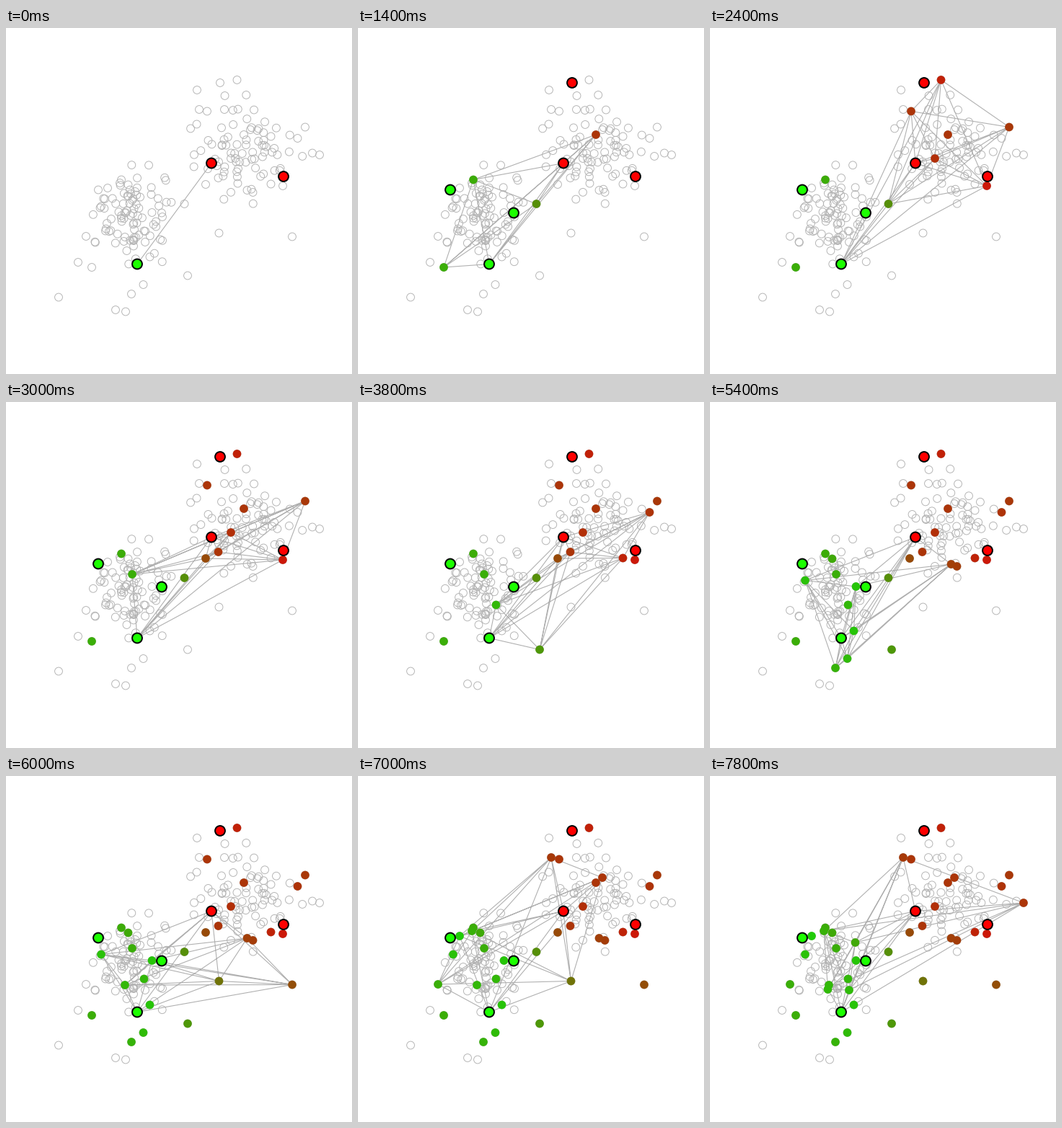
A matplotlib script for the animation above (8000 ms loop, 480 by 480 pixels).

```python
import itertools

import matplotlib.pyplot as plt
import numpy as np
from matplotlib.animation import FuncAnimation

SIZE, DPI = 480, 100
FRAMES, STEP = 40, 200
WINDOW = 6
PT = 72 / DPI  # points per pixel

# Known samples; the first of each class is a pole of the graph.
REDS = [(285, 187.5), (385, 206), (297, 76)]
GREENS = [(182, 327.5), (128, 224.5), (216, 256.5)]
POLES = [REDS[0], GREENS[0]]

# Unlabelled samples in order of arrival.
GUESSES = [
    (160, 210.5), (119, 332), (330, 148), (247.5, 244), (320.5, 72),
    (279, 115.5), (415, 137.5), (384, 219), (312, 181), (175, 239),
    (294.5, 208), (277, 217), (252, 343.5), (191.5, 281.5), (367.5, 216.5),
    (404.5, 153), (342.5, 228), (169.5, 217.5), (199.5, 317.5), (174, 369),
    (190.5, 356), (202.5, 256), (334.5, 225), (132, 247.5), (397, 289.5),
    (165, 290), (295.5, 284.5), (339, 141), (141, 222), (111, 289),
    (268, 113), (158, 215), (435, 176), (201.5, 231), (193, 297),
    (163.5, 296),
]
STRAYS = [(73, 373.5), (152, 391), (166, 393.5), (100, 325), (265, 86),
          (425, 173.5)]


def arrivals():
    """Stream of (point, label); the label is None for a guess."""
    stream = [(p, None) for p in GUESSES]
    stream.insert(0, (GREENS[1], "green"))
    stream.insert(3, (REDS[2], "red"))
    stream.insert(5, (GREENS[2], "green"))
    return stream


def blob(rng, center, spread, count):
    """Normal cloud without its far tails."""
    z = rng.normal(size=(4 * count, 2))
    z = z[np.hypot(*z.T) < 2.1][:count]
    return z * spread + center


def cloud():
    rng = np.random.default_rng(7)
    return np.vstack([
        REDS, GREENS, GUESSES, STRAYS,
        blob(rng, (178, 268), (31, 39), 80),
        blob(rng, (330, 177), (41, 42), 76),
    ])


def tint(point):
    """Blend of both classes, weighted by closeness to known samples."""
    pull = [sum(1 / np.hypot(point[0] - x, point[1] - y) for x, y in group)
            for group in (REDS, GREENS)]
    p = pull[0] / sum(pull)
    return 0.92 * p, 0.95 * (1 - p) ** 1.15, 0.03


def area(diameter):
    return (diameter * PT) ** 2


fig = plt.figure(figsize=(SIZE / DPI, SIZE / DPI), dpi=DPI, facecolor="white")
ax = fig.add_axes([0, 0, 1, 1])
ax.set_xlim(0, SIZE)
ax.set_ylim(SIZE, 0)
ax.axis("off")

ax.scatter(*cloud().T, s=area(10.8), facecolors="none", edgecolors="#b4b4b4",
           linewidths=0.95 * PT, zorder=1)
edges, = ax.plot([], [], color="#b0b0b0", lw=1.1 * PT, zorder=2)
guesses = ax.scatter([], [], s=area(11.6), linewidths=0, zorder=3)
labels = ax.scatter([], [], s=area(13.8), edgecolors="black",
                    linewidths=2 * PT, zorder=4)

COLORS = {"red": "#ff0000", "green": "#1cff00"}
START = [(REDS[0], "red"), (REDS[1], "red"), (GREENS[0], "green")]
STREAM = arrivals()


def show(dots, points, colors):
    dots.set_offsets(np.array(points, float).reshape(-1, 2))
    dots.set_facecolors(colors)


def draw(i):
    seen = START + STREAM[:i]
    known = [(p, COLORS[label]) for p, label in seen if label]
    guessed = [p for p, label in seen if not label]
    nodes = POLES + guessed[-WINDOW:]
    path = [q for a, b in itertools.combinations(nodes, 2)
            for q in (a, b, (np.nan, np.nan))]
    edges.set_data(*np.array(path).T)
    show(guesses, guessed, [tint(p) for p in guessed])
    show(labels, *zip(*known))
    return edges, guesses, labels


anim = FuncAnimation(fig, draw, frames=FRAMES, interval=STEP, repeat=True,
                     repeat_delay=0, blit=False)
plt.show()
```
